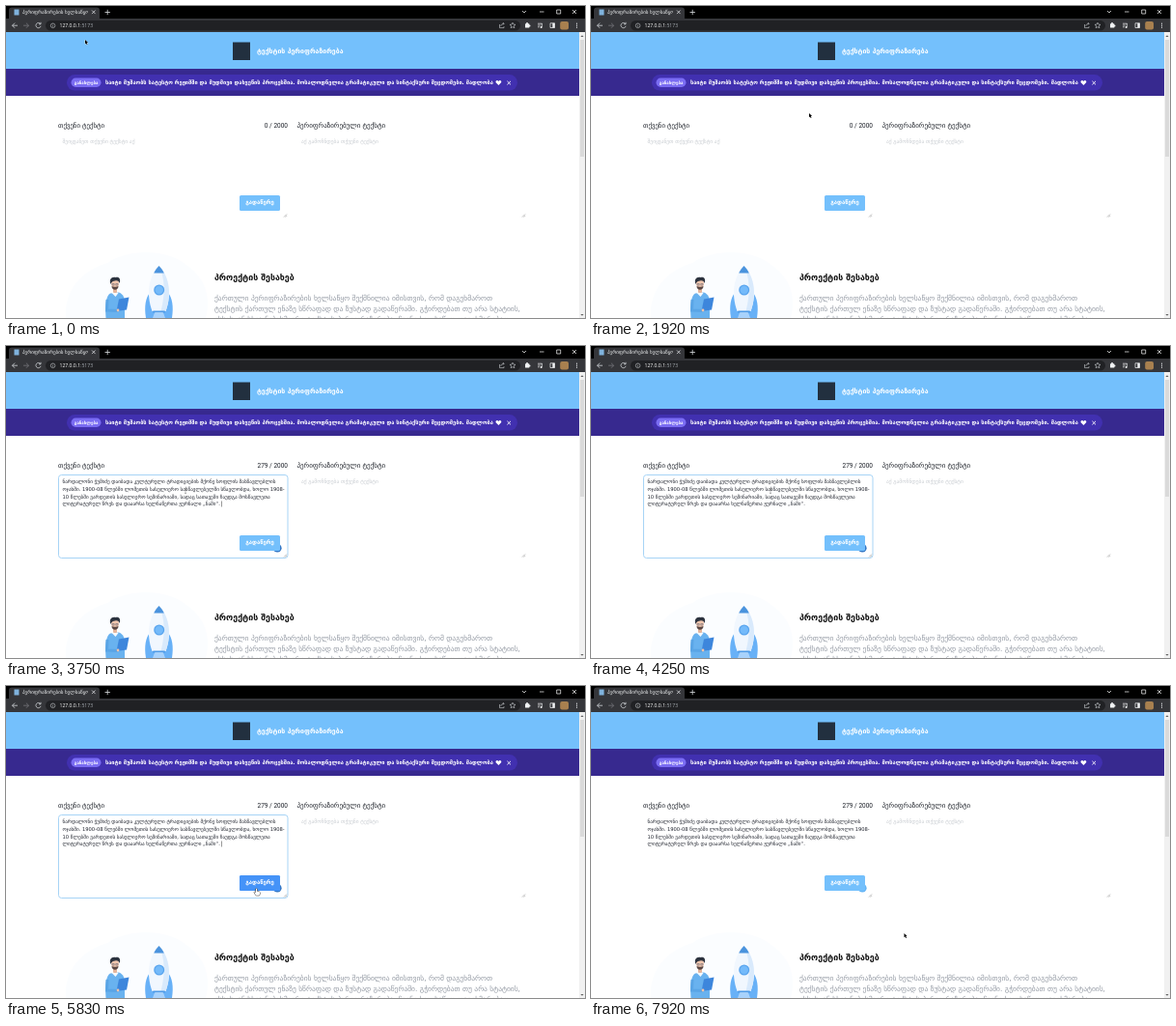
An HTML page with a canvas for the animation above (8000 ms loop, 600 by 323 pixels).

```html
<!DOCTYPE html>
<html lang="ka">
<head>
<meta charset="utf-8">
<title>პერიფრაზირების ხელსაწყო</title>
<style>
html, body { margin: 0; width: 100%; height: 100%; overflow: hidden; background: #fff; }
canvas { display: block; width: 600px; height: 323px; }
</style>
</head>
<body>
<canvas id="stage"></canvas>
<script>
const LOOP = 8000, W = 600, H = 323;
const canvas = document.getElementById('stage');
const ctx = canvas.getContext('2d');
const dpr = window.devicePixelRatio || 1;
canvas.width = W * dpr;
canvas.height = H * dpr;

const SKY = '#74c0fc';
const FOCUS = 2290, ICON = 2920, PASTE = 3580, HOVER = 5400, BLUR = 6230, LEAVE = 6900;
const BUTTON = [242, 196, 42, 16];
const FIELD = [54.5, 133.5, 237.5, 86];

// time, x, y of the pointer tip
const PATH = [
  [0, 82, 35], [80, 82, 35], [420, 132, 78], [830, 185, 152], [1000, 185, 153], [1080, 186, 151],
  [1840, 186, 151], [1910, 226, 111], [1990, 226, 111], [2240, 186, 150], [4680, 186, 150],
  [4960, 289, 228], [5080, 291, 229], [5170, 277, 228], [5420, 266, 210], [5580, 259, 209.5],
  [6880, 259, 209.5], [7080, 324.5, 256]
];

const clamp = v => Math.max(0, Math.min(1, v));
const fade = (t, from, ms = 150) => clamp((t - from) / ms);

function rect(x, y, w, h, color, r = 0) {
  ctx.fillStyle = color;
  ctx.beginPath();
  ctx.roundRect(x, y, w, h, r);
  ctx.fill();
}
function disc(x, y, r, color, ry = r) {
  ctx.fillStyle = color;
  ctx.beginPath();
  ctx.ellipse(x, y, r, ry, 0, 0, Math.PI * 2);
  ctx.fill();
}
function shape(d, color) {
  ctx.fillStyle = color;
  ctx.fill(new Path2D(d));
}
function line(d, color, width = 0.8) {
  ctx.strokeStyle = color;
  ctx.lineWidth = width;
  ctx.stroke(new Path2D(d));
}
function text(str, x, y, size, color, weight = 400, align = 'left', family = '"DejaVu Sans"') {
  ctx.font = `${weight} ${size}px ${family}, sans-serif`;
  ctx.fillStyle = color;
  ctx.textAlign = align;
  ctx.fillText(str, x, y);
}

function drawBrowser() {
  rect(0, 0, W, 13, '#000');
  rect(3, 1.5, 94, 14, '#35363a', [3, 3, 0, 0]);
  rect(0, 13, W, 14, '#35363a');
  rect(8.5, 3.5, 5, 6, '#7fb2dd');
  ctx.save();
  ctx.beginPath();
  ctx.rect(16, 0, 69, 13);
  ctx.clip();
  text('პერიფრაზირების ხელსაწყო', 17, 8.4, 5.1, '#f1f3f4');
  ctx.restore();
  line('M89 4.5l3.6 3.6m0-3.6l-3.6 3.6M102.5 6.5h5.4M105.2 3.8v5.4', '#dcdfe2', 0.8);
  line('M535 5l2 2 2-2M553 6h4.5M570.7 4h4v4h-4zM587 4l4 4m0-4l-4 4', '#fff', 0.7);

  line('M12 20.2H6.5m2.6-2.6l-2.6 2.6 2.6 2.6', '#d5d8dc');
  line('M18 20.2h5.5m-2.6-2.6l2.6 2.6-2.6 2.6', '#75777b');
  line('M35.6 18.4a2.6 2.6 0 1 0 .5 2.4M36 16.8v2h-2', '#d5d8dc');
  rect(41, 15, 492, 10.4, '#202124', 5.2);
  line('M46.3 20.3a2.3 2.3 0 1 0 4.6 0a2.3 2.3 0 1 0-4.6 0M48.6 19.9v1.6M48.6 18.7v.5', '#c5c8cc', 0.6);
  const host = '127.0.0.1';
  text(host, 55.5, 22.2, 5.1, '#fff', 500, 'left', '"Open Sans"');
  text(':5173', 55.5 + ctx.measureText(host).width, 22.2, 5.1, '#a9aeb4', 400, 'left', '"Open Sans"');
  line('M511.5 19v3.6h4.5v-1.5M512.8 20.8c.2-1.7 1.2-2.5 3.2-2.5m-1.2-1.3l1.3 1.3-1.3 1.3', '#cfd2d6', 0.6);
  line('M525 17.2l.9 1.9 2.1.2-1.6 1.4.5 2-1.9-1-1.9 1 .5-2-1.6-1.4 2.1-.2z', '#cfd2d6', 0.6);
  rect(538, 18.3, 4.3, 4.3, '#f1f3f4', 0.5);
  disc(540, 18, 1, '#f1f3f4');
  disc(542.5, 20.4, 1, '#f1f3f4');
  line('M551 18.2h4.5M551 20h2.8M551 21.8h1.8M555.3 18v3.8', '#f1f3f4', 0.7);
  disc(554.6, 22, 1, '#f1f3f4');
  line('M564 17.8h4.5v4.7H564z', '#f1f3f4', 0.7);
  rect(566.3, 17.8, 2.2, 4.7, '#f1f3f4');
  rect(574.2, 16, 8.8, 8.6, '#a8804f', 2);
  for (const y of [18.2, 20.2, 22.2]) disc(591.5, y, 0.6, '#e8eaed');

  rect(594, 27, 6, 296, '#f1f1f1');
  rect(595, 35, 4, 121, '#dadada');
  shape('M595.4 32h3.2l-1.6-1.8z', '#606060');
  shape('M595.4 319h3.2l-1.6 1.8z', '#606060');
}

function drawBanner() {
  rect(0, 27, 594, 38, SKY);
  rect(235, 37.5, 18, 18.5, '#22303f');
  text('ტექსტის პერიფრაზირება', 260, 48.7, 6.95, '#fff', 700);
  rect(0, 65, 594, 28, '#37298f');
  rect(63, 71, 467, 16.6, '#4130b0', 8.3);
  rect(67.5, 74.6, 31, 9.4, '#7a6cf3', 4.7);
  text('განახლება', 83, 80.9, 4.4, '#fff', 700, 'center');
  text('საიტი მუშაობს სატესტო რეჟიმში და მუდმივი დახვეწის პროცესშია. მოსალოდნელია გრამატიკული და სინტაქსური შეცდომები. მადლობა',
    103, 81.1, 5.68, '#fff', 700);
  shape('M510.4 82l-2.7-2.8c-1-1.5 1.4-3.3 2.7-1.3 1.3-2 3.7-.2 2.7 1.3z', '#fff');
  line('M519.4 77.8l3.6 3.6m0-3.6l-3.6 3.6', '#fff', 0.9);
}

function drawRocket() {
  shape('M149 297c-4 5-6 13-4 26h9l1-12zM168 297c4 5 6 13 4 26h-9l-1-12z', '#68b1f7');
  shape('M158.5 269c-10 10-14 28-7 47h14c7-19 3-37-7-47z', '#f1f7fe');
  shape('M158.5 269c10 10 14 28 7 47h-5c5-19 4-35-2-47z', '#d9eafc');
  shape('M158.5 269c-2.2 2.2-4 4.700-5.300 7.500h10.600c-1.300-2.800-3.100-5.300-5.300-7.500z', '#4a93dd');
  disc(158.7, 294, 5.5, '#5aa5ee');
  disc(158.7, 294, 4.2, '#74bafa');
  rect(152, 315.5, 13, 2, '#4f9be8', 1);
  shape('M154 317.5h9l2 5.500h-13z', '#a8d2fc');
}

function drawMan() {
  shape('M103.500 323c-1-13 0-23 4.500-25.500l9-1c5 2 6 6 6 12v14.500z', '#69b2ef');
  shape('M109.500 297h7l-3 4z', '#f4f9fe');
  rect(111, 291, 4, 6, '#e5b69c', 1);
  disc(113, 287.5, 4, '#efc5ad', 4.8);
  shape('M108.500 288c-2-5 1-8 5-7 4-1 5.500 2 4.200 6-1-2.500-2.500-3-4.700-2.500-2 0-3.500.5-4.500 3.500z', '#2c333f');
  shape('M109.500 290c1.500 1 5.500 1 7 0 0 5-7 5-7 0z', '#594744');
  line('M110 287.500h2.200v1.600h-2.200zM113.800 287.500h2.200v1.600h-2.200z', '#38455e', 0.4);
  line('M105 304l-.500 11 12 .5', '#5aa5e6', 3);
  shape('M117 303.500l10.500-2-2.500 13-10.500 1.500z', '#3d86dc');
  disc(116, 315, 1.4, '#efc5ad');
}

function drawAbout() {
  shape('M62 323c-2-25 13-48 43-57 23-15 59-14 79 0 23 15 29 36 23 57z', '#fbfdff');
  drawRocket();
  drawMan();
  text('პროექტის შესახებ', 216, 284.3, 8.8, '#111', 700);
  [
    'ქართული პერიფრაზირების ხელსაწყო შექმნილია იმისთვის, რომ დაგეხმაროთ',
    'ტექსტის ქართულ ენაზე სწრაფად და ზუსტად გადაწერაში. გჭირდებათ თუ არა სტატიის,',
    'ესსეს, ან სხვა ნებისმიერი ტექსტის პერიფრაზირება, ჩვენი ხელსაწყო დაგეხმარებათ'
  ].forEach((s, i) => text(s, 216, 304.8 + i * 10.9, 7.52, '#949aa4'));
}

function grip(x, y) {
  line(`M${x - 3} ${y}l3-3M${x - 1.3} ${y}l1.300-1.300`, '#777', 0.5);
}

const LINES = [
  'ნარდალონი ჭუმიძე დაიბადა კულტურული ტრადიციების მქონე სოფლის მასწავლებლის',
  'ოჯახში. 1900-08 წლებში ლომეთის სასულიერო სასწავლებელში სწავლობდა, ხოლო 1908-',
  '10 წლებში ვარდეთის სასულიერო სემინარიაში, სადაც სათავეში ჩაუდგა მოსწავლეთა',
  'ლიტერატურულ წრეს და დააარსა ხელნაწერთა ჟურნალი „ნამი“.'
];

function drawForm(t) {
  const pasted = t >= PASTE;
  const focus = fade(t, FOCUS) - fade(t, BLUR, 120);
  text('თქვენი ტექსტი', 54, 125.8, 6.8, '#1b1f27');
  text(pasted ? '279 / 2000' : '0 / 2000', 292, 125.8, 6.5, '#1b1f27', 400, 'right', 'Roboto');
  text('პერიფრაზირებული ტექსტი', 301.5, 125.8, 7, '#1b1f27');
  text('აქ გამოჩნდება თქვენი ტექსტი', 306, 142, 5.5, '#c8ccd1');

  if (focus > 0) {
    ctx.globalAlpha = focus;
    ctx.strokeStyle = '#9dd0f5';
    ctx.lineWidth = 0.9;
    ctx.beginPath();
    ctx.roundRect(...FIELD, 3);
    ctx.stroke();
    ctx.globalAlpha = 1;
  }
  let caretX = 58.7, caretY = 137.3;
  if (pasted) {
    LINES.forEach((s, i) => text(s, 58.5, 142.2 + i * 7.75, 5.2, '#20242e'));
    caretX += ctx.measureText(LINES[3]).width + 1.5;
    caretY += 23.25;
  } else {
    text('შეიყვანეთ თქვენი ტექსტი აქ', 58.5, 142, 5.5, '#c8ccd1');
  }
  const blinkOn = t < ICON || (t >= 3450 && t < PASTE) || (t >= PASTE && (t - PASTE) % 1060 < 530);
  if (t >= FOCUS && t < BLUR && blinkOn) rect(caretX, caretY, 0.5, 6, '#333');

  if (t >= ICON) disc(281.2, 209.2, 4.4, t < BLUR ? '#3578c6' : '#65b5f5');
  rect(...BUTTON, SKY, 1.6);
  ctx.globalAlpha = fade(t, HOVER) - fade(t, LEAVE);
  rect(...BUTTON, '#4593f8', 1.6);
  ctx.globalAlpha = 1;
  text('გადაწერე', 263, 205.3, 5.9, '#fff', 700, 'center');
  grip(291, 218.5);
  grip(538, 218.5);
}

function pointer(t) {
  let i = 1;
  while (i < PATH.length - 1 && PATH[i][0] < t) i++;
  const [t0, x0, y0] = PATH[i - 1], [t1, x1, y1] = PATH[i];
  const k = clamp((t - t0) / (t1 - t0));
  return [x0 + (x1 - x0) * k, y0 + (y1 - y0) * k];
}
const inside = (x, y, [l, top, w, h]) => x > l && x < l + w && y > top && y < top + h;

function drawPointer(t) {
  const [x, y] = pointer(t);
  ctx.save();
  ctx.translate(x, y);
  ctx.lineJoin = 'round';
  if (inside(x, y, BUTTON)) {
    const hand = 'M0 .3c.8-.5 1.300 0 1.300.7v2.200l2 .4c.7.2.9.6.8 1.300l-.5 2.400H.2L-1.800 4.500c-.3-.7.5-1 1-.6l.6.6z';
    line(hand, '#111', 0.9);
    shape(hand, '#fff');
  } else if (inside(x, y, FIELD)) {
    line('M-1-2.500h2M0-2.500v5M-1 2.500h2', '#666', 0.45);
  } else {
    const arrow = 'M0 0v4.300l1-.9 .7 1.600 .8-.3-.7-1.600h1.300z';
    line(arrow, '#fff', 0.6);
    shape(arrow, '#000');
  }
  ctx.restore();
}

function draw(now) {
  const t = now % LOOP;
  ctx.setTransform(dpr, 0, 0, dpr, 0, 0);
  rect(0, 0, W, H, '#fff');
  drawAbout();
  drawBanner();
  drawForm(t);
  drawBrowser();
  drawPointer(t);
}

const start = performance.now();
function tick() {
  draw(performance.now() - start);
  requestAnimationFrame(tick);
}
tick();
</script>
</body>
</html>
```
